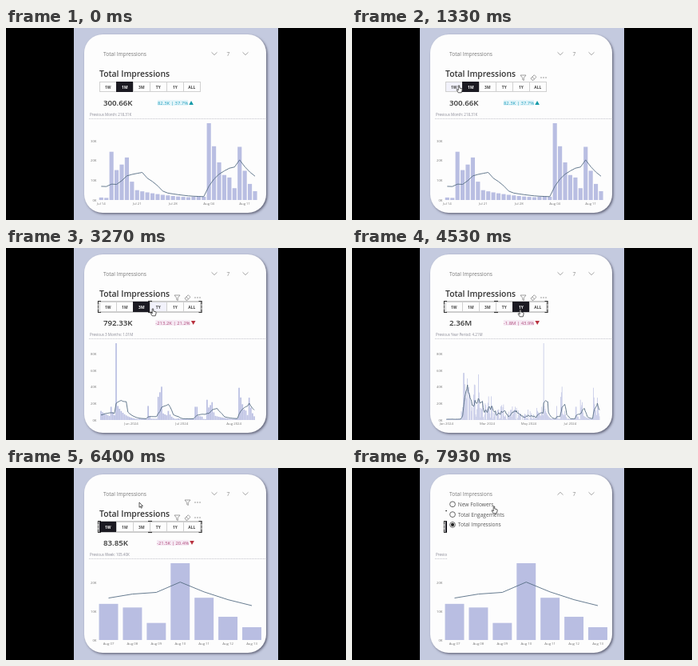
Animation, 426 px wide and 240 px high, one loop 8 s. Source, as an HTML page with a canvas:

```html
<!DOCTYPE html>
<html lang="en">
<head>
<meta charset="utf-8">
<title>Total Impressions</title>
<style>
  html, body { margin: 0; width: 100%; height: 100%; overflow: hidden; background: #000; }
  canvas { display: block; width: 100vw; height: 100vh; }
</style>
</head>
<body>
<canvas id="stage" width="426" height="240"></canvas>
<script>
const ctx = document.getElementById('stage').getContext('2d');
const LOOP = 8000, BASE = 215, CHART_HEIGHT = 96;
const FONT = '"Open Sans", "Noto Sans", sans-serif';
const DAY = 864e5, LAST_DAY = Date.UTC(2024, 7, 13), YEAR = 366;

let seed = 11;
const random = () => (seed = (seed * 16807) % 2147483647) / 2147483647;

// Each post peaks and then fades: days before the last day, peak in thousands, daily factor
const posts = [
  [91, 11, 0.85], [85, 16, 0.6], [82, 93, 0.2], [81, 17, 0.8], [63, 17, 0.25], [57, 28, 1.2], [54, 8, 0.85],
  [51, 11, 0.6], [35, 16, 1], [33, 5, 0.9], [30, 1, 1], [28, 24.5, 0.62], [26, 18, 1.2], [24, 9.3, 0.55],
  [23, 5, 0.88], [9, 39, 0.7], [6, 12.7, 0.9], [4, 6, 1], [3, 27, 0.55]
];

// Early days: quiet, then a campaign that swells every 18 days and fades out
function campaignDay(day) {
  const start = 162;
  if (day < start) return 0.5 + random();
  const level = 5 + 32 * Math.exp((start - day) / 25);
  const swell = 1 + 0.4 * Math.cos((day - start - 6) * 2 * Math.PI / 18);
  return Math.min(57, level * swell * 2.4 * random() ** 1.5);
}

const daily = Array.from({ length: YEAR }, (_, day) => {
  const back = YEAR - 1 - day;
  const post = posts.filter(p => p[0] >= back).pop();
  if (!post) return campaignDay(day);
  const [start, peak, factor] = post;
  return Math.max(peak * factor ** (start - back), 1 + random());
});
const weekMean = i => {
  const week = daily.slice(Math.max(0, i - 6), i + 1);
  return week.reduce((a, b) => a + b) / week.length;
};

// from, to: centres of the first and last bar; labels every so many days or months
const views = {
  '1W': { value: '83.85K', change: '-21.5K | 20.4%', previous: 'Previous Week: 105.40K',
    days: 7, from: 128.5, to: 308, everyDays: 1 },
  '1M': { value: '300.66K', change: '82.3K | 37.7%', up: true, previous: 'Previous Month: 218.31K',
    days: 31, from: 119.3, to: 312, everyDays: 7 },
  '3M': { value: '792.33K', change: '-213.2K | 21.2%', previous: 'Previous 3 Months: 1.01M',
    days: 92, from: 119, to: 311, everyMonths: 1 },
  'TY': { value: '2.36M', change: '-1.8M | 43.9%', previous: 'Previous Year Period: 4.21M',
    days: 226, from: 118.3, to: 310, everyMonths: 2 },
  '1Y': { value: '2.66M', change: '-2.1M | 44.1%', previous: 'Previous Year: 4.76M',
    days: YEAR, from: 118.3, to: 310, everyMonths: 2 }
};
const buttons = ['1W', '1M', '3M', 'TY', '1Y', 'ALL'];

// The chart follows each button press after a short load
const presses = [[0, '1M'], [1670, '1W'], [2670, '3M'], [3600, 'TY'], [4440, '1Y'], [5530, '1W']];
const LOAD = 270, MENU_OPENS = 7000;
const pressedAt = t => presses.filter(p => p[0] <= t).pop()[1];

// Arrival time and place of each pointer stop
const stops = [[0, 352, 150], [1250, 134, 72], [2450, 170, 76], [3250, 184, 76], [4400, 211, 77],
  [5450, 128, 74], [6350, 167, 43], [6950, 150, 34], [7900, 178, 48]];
const TRAVEL = 550;
function cursorAt(t) {
  let [, x, y] = stops[0];
  for (const [arrival, nextX, nextY] of stops.slice(1)) {
    const p = Math.min(1, Math.max(0, 1 - (arrival - t) / TRAVEL));
    const e = p * p * (3 - 2 * p);
    x += (nextX - x) * e;
    y += (nextY - y) * e;
  }
  return [x, y];
}

function text(str, x, y, size, color, { weight = 400, align = 'left' } = {}) {
  ctx.font = `${weight} ${size}px ${FONT}`;
  ctx.fillStyle = color;
  ctx.textAlign = align;
  ctx.fillText(str, x, y);
}
function rect(x, y, w, h, color) {
  ctx.fillStyle = color;
  ctx.fillRect(x, y, w, h);
}
function line(points, color, width = 1) {
  ctx.beginPath();
  points.forEach(([x, y]) => ctx.lineTo(x, y));
  ctx.strokeStyle = color;
  ctx.lineWidth = width;
  ctx.stroke();
}
function shape(points, fill, stroke, width = 0.7) {
  ctx.beginPath();
  points.forEach(([x, y]) => ctx.lineTo(x, y));
  ctx.closePath();
  if (fill) { ctx.fillStyle = fill; ctx.fill(); }
  if (stroke) { ctx.strokeStyle = stroke; ctx.lineWidth = width; ctx.stroke(); }
}
function disc(x, y, r, fill, stroke) {
  ctx.beginPath();
  ctx.arc(x, y, r, 0, 7);
  if (fill) { ctx.fillStyle = fill; ctx.fill(); }
  if (stroke) { ctx.strokeStyle = stroke; ctx.lineWidth = 0.9; ctx.stroke(); }
}
const chevron = (x, y, dir) =>
  line([[x - 3.5, y - 1.7 * dir], [x, y + 1.7 * dir], [x + 3.5, y - 1.7 * dir]], '#9a9a9a', 0.9);

function drawCard() {
  rect(85, 0, 256, 240, '#c4cadf');
  ctx.save();
  ctx.shadowColor = 'rgba(50, 50, 70, .65)';
  ctx.shadowBlur = 3;
  ctx.shadowOffsetX = ctx.shadowOffsetY = 1.5;
  ctx.fillStyle = '#fdfdfd';
  ctx.beginPath();
  ctx.roundRect(98, 8, 228, 223, 23);
  ctx.fill();
  ctx.restore();
}

function drawHeader(open) {
  text('Total Impressions', 122, 35.3, 6.6, '#777');
  chevron(261, 32, open ? -1 : 1);
  text('7', 278.5, 35, 6.6, '#888', { align: 'center' });
  chevron(300, 32, 1);
}

function funnel(x, y) {
  shape([[x - 3.5, y - 3], [x + 3.5, y - 3], [x + 0.8, y + 0.3], [x + 0.8, y + 3.5],
    [x - 0.8, y + 2.5], [x - 0.8, y + 0.3]], null, '#777');
}
function dots(x, y) {
  for (const dx of [-3, 0, 3]) disc(x + dx, y, 0.7, '#777');
}
function eraser(x, y) {
  shape([[x - 3.5, y + 1], [x + 0.8, y - 3.3], [x + 3.5, y - 0.6], [x - 0.5, y + 3.3], [x - 1.7, y + 3.3]], null, '#777');
  line([[x - 1.7, y - 0.8], [x + 1.2, y + 1.8]], '#777', 0.7);
}

function drawButtons(selected, [cx, cy], focused) {
  buttons.forEach((label, i) => {
    const x = 117 + i * 21, active = label === selected;
    const hover = cx >= x && cx < x + 21 && cy > 66 && cy < 81;
    rect(x, 67, 21, 13, active ? '#1b1a22' : hover ? '#f2f2fb' : '#fdfdfd');
    ctx.strokeStyle = active ? '#1b1a22' : '#d0d0d0';
    ctx.lineWidth = 1;
    ctx.strokeRect(x + 0.5, 67.5, 21, 12);
    text(label, x + 10.8, 75.5, 4.9, active ? '#fff' : '#444', { weight: 700, align: 'center' });
  });
  if (!focused) return;
  ctx.strokeStyle = '#aaa';
  ctx.lineWidth = 0.6;
  ctx.strokeRect(115.5, 66.5, 129.5, 14);
  for (const [x, dx] of [[115.5, 3.5], [245, -3.5]]) {
    for (const [y, dy] of [[66.5, 4], [80.5, -4]]) line([[x + dx, y], [x, y], [x, y + dy]], '#333', 1.2);
    line([[x, 71.5], [x, 75.5]], '#555', 1.2);
  }
  for (const y of [66.5, 80.5]) line([[178, y], [183, y]], '#333', 1.2);
}

function drawSummary({ value, change, up, previous }) {
  text(value, 122, 97, 9.7, '#333', { weight: 600 });
  ctx.font = `400 5.9px ${FONT}`;
  const half = ctx.measureText(change).width / 2;
  rect(209 - half, 90, half * 2, 7, up ? '#e3f5fa' : '#f6eaf4');
  text(change, 209, 95.5, 5.9, up ? '#1d9dbc' : '#b04c7c', { align: 'center' });
  const x = 213 + half, d = up ? 1 : -1;
  shape([[x - 2.8, 93.5 + 2.4 * d], [x + 2.8, 93.5 + 2.4 * d], [x, 93.5 - 2.6 * d]], up ? '#159aa8' : '#b8323f');
  text(previous, 105, 110, 4.5, '#888894');
  ctx.setLineDash([1, 1]);
  line([[104, 113.5], [325, 113.5]], '#c4c4cc');
  ctx.setLineDash([]);
}

// Label of a day on the time axis, or nothing
function dayLabel(view, i) {
  const date = new Date(LAST_DAY - (view.days - 1 - i) * DAY);
  const month = date.toLocaleString('en-US', { month: 'short', timeZone: 'UTC' });
  const dayOfMonth = date.getUTCDate();
  if (view.everyDays) return i % view.everyDays ? '' : `${month} ${String(dayOfMonth).padStart(2, '0')}`;
  return dayOfMonth === 1 && date.getUTCMonth() % view.everyMonths === 0 ? `${month} ${date.getUTCFullYear()}` : '';
}
for (const view of Object.values(views)) view.labels = Array.from({ length: view.days }, (_, i) => dayLabel(view, i));

function drawChart(view) {
  const offset = YEAR - view.days;
  const pitch = (view.to - view.from) / (view.days - 1), bar = pitch * 0.8;
  const peak = Math.max(...daily.slice(offset));
  const step = peak > 50 ? 20 : 10;
  const yAt = v => BASE - v / peak * CHART_HEIGHT;
  for (let k = 0; k <= peak; k += step) text(k + 'K', 113.5, yAt(k) + 1.5, 4.3, '#777', { align: 'right' });
  const average = view.labels.map((label, i) => {
    const x = view.from + i * pitch, y = yAt(daily[offset + i]);
    rect(x - bar / 2, y, bar, BASE - y, '#b9bee2');
    text(label, x, 221, 4.3, '#777', { align: 'center' });
    return [x, yAt(weekMean(offset + i))];
  });
  ctx.lineJoin = 'round';
  line(average, '#566e84', 0.9);
}

function drawMenu() {
  rect(119, 38, 206, 77, '#fdfdfd');
  ['New Followers', 'Total Engagements', 'Total Impressions'].forEach((label, i) => {
    const y = 45.3 + i * 12.8;
    disc(126, y, 3.4, null, '#555');
    if (i === 2) disc(126, y, 2.1, '#222');
    text(label, 132.8, y + 2.5, 6.6, '#555');
  });
}

function drawCursor([x, y], hand) {
  ctx.save();
  ctx.translate(x, y);
  ctx.lineJoin = 'round';
  const outline = hand
    ? [[-0.8, 0], [0.7, 0], [0.8, 3], [3.8, 3.8], [4.2, 5], [3.2, 8.8], [-0.8, 8.8], [-3, 5.3], [-2.2, 4.6], [-0.8, 6]]
    : [[0, 0], [0, 6.3], [1.4, 5], [2.4, 7.2], [3.5, 6.7], [2.5, 4.6], [4.4, 4.5]];
  shape(outline, '#fff', '#333', 0.8);
  ctx.restore();
}

function draw(t) {
  const cursor = cursorAt(t), open = t >= MENU_OPENS;
  ctx.clearRect(0, 0, 426, 240);
  ctx.save();
  ctx.beginPath();
  ctx.rect(85, 0, 256, 240);
  ctx.clip();
  drawCard();
  text('Total Impressions', 117, 60.6, 10.4, '#333', { weight: 600 });
  const view = views[pressedAt(Math.max(0, t - LOAD))];
  drawButtons(pressedAt(t), cursor, t >= 2700);
  drawSummary(view);
  drawChart(view);
  if (t > 1000 && !open) {
    funnel(214.5, 62);
    eraser(227.5, 62);
    dots(240, 62);
  }
  if (t > 6250 && !open) {
    funnel(227.5, 43);
    dots(240, 43);
  }
  if (open) drawMenu();
  drawHeader(open);
  const overButtons = cursor[1] > 66 && cursor[1] < 81 && cursor[0] < 243;
  drawCursor(cursor, overButtons || (open && cursor[1] > 38));
  ctx.restore();
}

function tick() {
  draw(performance.now() % LOOP);
  requestAnimationFrame(tick);
}
tick();
</script>
</body>
</html>
```
